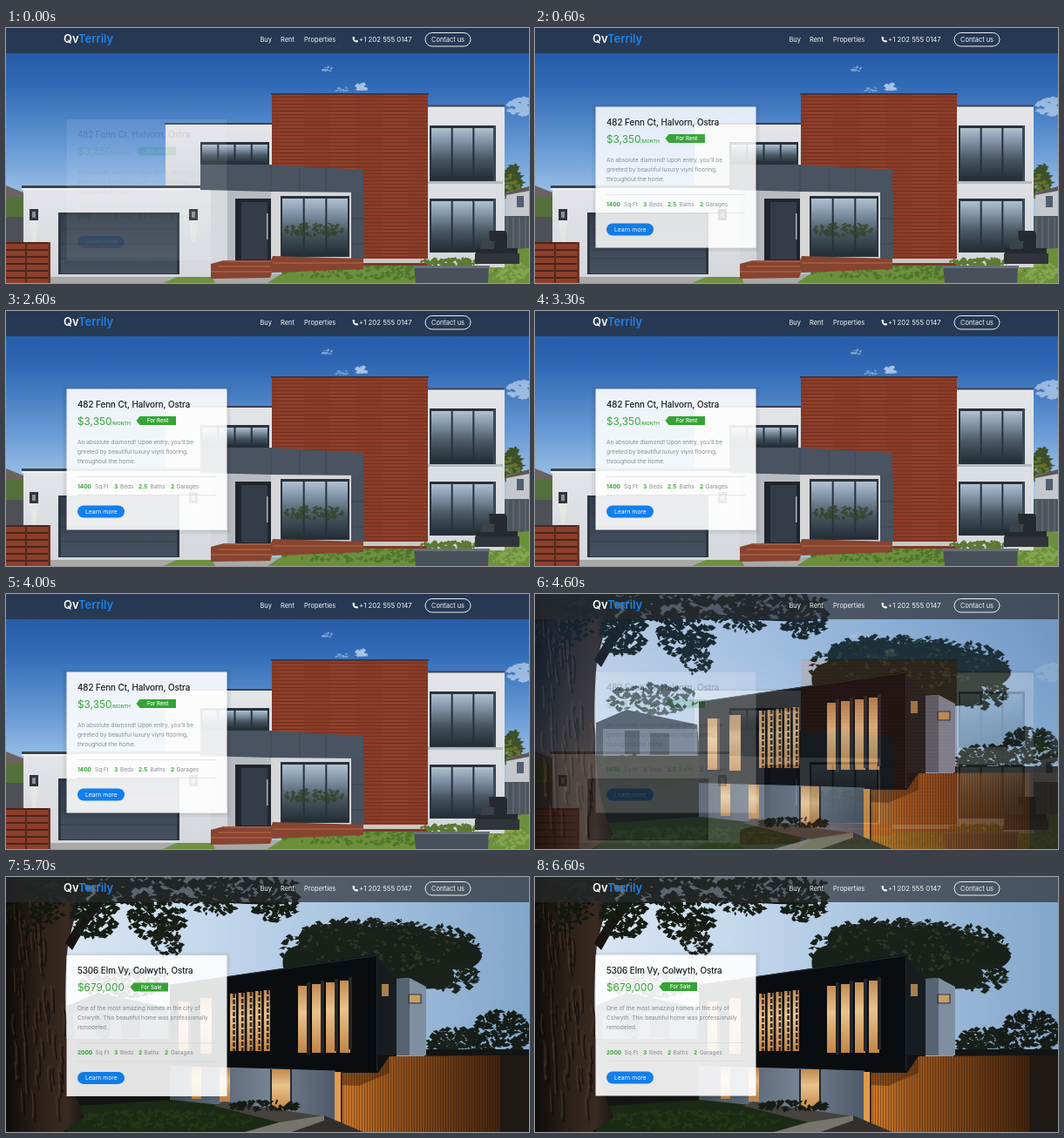
An HTML page for the animation above (6700 ms loop, 600 by 293 pixels).

```html
<!DOCTYPE html>
<html lang="en">
<head>
<meta charset="utf-8">
<title>Homes</title>
<style>
html, body { margin: 0; width: 100%; height: 100%; overflow: hidden; background: #26344e; }
svg { display: block; width: 100vw; height: 100vh; }
text { font-family: Inter, "Open Sans", sans-serif; white-space: pre; }
</style>
</head>
<body>
<svg id="stage" viewBox="0 0 600 293" preserveAspectRatio="none"></svg>
<script>
const LOOP = 6700, STEP = 100, FADE_START = 4300, FADE = 600, ENTRANCE = 1000, RISE = 17;

const rect = (x, y, w, h, fill, extra = '') =>
  `<rect x="${x}" y="${y}" width="${w}" height="${h}" fill="${fill}" ${extra}/>`;
const poly = (points, fill, extra = '') => `<polygon points="${points}" fill="${fill}" ${extra}/>`;
const path = (d, fill, extra = '') => `<path d="${d}" fill="${fill}" ${extra}/>`;
const line = (d, stroke, width = 1, extra = '') =>
  `<path d="${d}" fill="none" stroke="${stroke}" stroke-width="${width}" ${extra}/>`;
const text = (x, y, size, fill, str, extra = '') =>
  `<text x="${x}" y="${y}" font-size="${size}" fill="${fill}" ${extra}>${str}</text>`;
const gradient = (id, stops, dir = 'x2="0" y2="1"') =>
  `<linearGradient id="${id}" ${dir}>${stops.map(([o, c]) =>
    `<stop offset="${o}" stop-color="${c}"/>`).join('')}</linearGradient>`;
const slats = (id, w, h, base, content) =>
  `<pattern id="${id}" width="${w}" height="${h}" patternUnits="userSpaceOnUse">${rect(0, 0, w, h, base)}${content}</pattern>`;
const range = n => [...Array(n).keys()];

function random(seed) {
  return () => (seed = (seed * 16807) % 2147483647) / 2147483647;
}

// Scatter of small leaf shapes inside an ellipse.
function leaves(cx, cy, rx, ry, count, size, fill, extra = '') {
  const rnd = random(Math.round(cx * 31 + cy * 17 + count));
  const d = range(count).map(() => {
    const a = rnd() * Math.PI * 2, k = Math.sqrt(rnd());
    const x = cx + Math.cos(a) * rx * k, y = cy + Math.sin(a) * ry * k;
    const w = size * (.4 + rnd()), h = size * (.3 + rnd() * .7), s = (rnd() - .5) * size;
    return `M${(x - w).toFixed(1)} ${(y + s).toFixed(1)}L${x.toFixed(1)} ${(y - h).toFixed(1)}` +
      `L${(x + w).toFixed(1)} ${(y - s).toFixed(1)}L${x.toFixed(1)} ${(y + h).toFixed(1)}Z`;
  }).join('');
  return path(d, fill, extra);
}

const defs = '<defs>' +
  gradient('daySky', [[0, '#1f509d'], [.22, '#3069b5'], [.46, '#6497d3'], [.68, '#a3c5e8']]) +
  gradient('duskSky', [[0, '#e2ebf4'], [.4, '#c3d7ec'], [.7, '#a3c0de'], [1, '#83a6cb']], 'x2="1" y2="0"') +
  gradient('glass', [[0, '#b0c1cf'], [.25, '#8396a9'], [.6, '#485761'], [1, '#232d34']]) +
  gradient('dayWall', [[0, '#e3e5e9'], [1, '#d4d7dc']]) +
  gradient('garage', [[0, '#343e4c'], [1, '#465160']]) +
  gradient('glow', [[0, '#c18b53'], [.4, '#e9c38d'], [1, '#c28446']]) +
  gradient('lowWall', [[0, '#454f5c'], [.6, '#768394'], [1, '#4d5867']], 'x2="1" y2="0"') +
  gradient('bark', [[0, '#0e0b09'], [.4, '#2b2019'], [.75, '#3a2b22'], [1, '#191310']], 'x2="1" y2="0"') +
  gradient('woodShade', [[0, '#d17c2c'], [.25, '#a05a1f'], [.6, '#713e17'], [1, '#3f240f']], 'x2="1" y2="0"') +
  slats('redWood', 60, 4, '#8b3c28', rect(0, 3, 60, 1, '#74311f') + rect(12, 1, 30, 1, '#93432f')) +
  slats('fence', 60, 8, '#8c3f2b', rect(0, 6, 60, 2, '#4c241b')) +
  slats('slats', 3, 20, 'none', rect(0, 0, 1, 20, '#2a1406', 'opacity=".4"')) +
  '</defs>';

function pane(x, y, w, h, columns) {
  const step = (w - 2) / columns;
  return rect(x, y, w, h, '#28313c') + range(columns).map(i =>
    rect(x + 2 + i * step, y + 3, step - 2, h - 5, 'url(#glass)')).join('');
}

function lamp(x, y) {
  return rect(x, y, 10, 13, '#30353c') + rect(x + 3, y + 3, 4, 7, '#8d8f8f') +
    poly(`${x},${y + 13} ${x + 10},${y + 13} ${x + 7},${y + 37} ${x + 3},${y + 37}`, '#f6f2e6', 'opacity=".4"');
}

function dayHouse() {
  const clouds = leaves(408, 68, 6, 4, 14, 3, '#dbe8f7', 'opacity=".7"') +
    leaves(384, 71, 10, 3, 12, 2, '#bdd5f0', 'opacity=".5"') +
    leaves(369, 48, 5, 4, 10, 2, '#bdd5f0', 'opacity=".55"') +
    leaves(591, 90, 14, 9, 45, 5, '#d7e5f5', 'opacity=".6"') +
    leaves(566, 101, 6, 3, 10, 2, '#bdd5f0', 'opacity=".4"');
  const surroundings =
    poly('0,181 20,189 20,212 0,212', '#6b625f') + rect(0, 194, 20, 24, '#54703c') +
    rect(0, 217, 22, 30, '#4d5157') +
    leaves(582, 177, 12, 21, 100, 4, '#3d5029') + leaves(578, 184, 10, 16, 40, 3, '#65722f') +
    poly('574,189 600,184 600,216 574,216', '#c4c7cb') + poly('572,190 600,182 600,187 574,192', '#5d5759') +
    rect(586, 193, 8, 13, '#525f70') + rect(568, 216, 32, 40, '#4e555c') +
    line('M575 217V256M582 217V256M589 217V256M596 217V256', '#6c747b') +
    rect(0, 283, 600, 10, '#aaa9a7') + poly('395,266 600,253 600,293 300,293 318,281', '#6c8f3c') +
    leaves(440, 280, 125, 8, 160, 3, '#4f772c') + leaves(575, 280, 24, 12, 60, 3, '#85a64f') +
    poly('180,293 196,286 236,285 240,293', '#6f9141');
  const upper =
    rect(183, 110, 123, 76, 'url(#dayWall)') + rect(182, 109, 124, 2, '#3c424e') +
    pane(223, 131, 79, 26, 4) +
    rect(484, 90, 88, 185, 'url(#dayWall)') + rect(484, 88.5, 88, 2, '#3c424e') +
    rect(484, 176, 86, 3, '#b5bac2') +
    pane(486, 112, 76, 64, 3) + pane(486, 196, 76, 62, 3) +
    rect(559, 112, 3, 64, '#3a4654') + rect(559, 196, 3, 62, '#3a4654') +
    rect(305, 76, 179, 197, 'url(#redWood)') + rect(304, 75, 181, 1.7, '#3a3238');
  const lower =
    rect(20, 182, 240, 104, 'url(#dayWall)') + rect(18, 181, 206, 3, '#3b434f') + rect(18, 184, 206, 2, '#f0f1f3') +
    rect(60, 212, 139, 71, '#2c3541') + rect(63, 215, 133, 67, 'url(#garage)') +
    line('M63 231H196M63 248H196M63 265H196', '#303947', .8) +
    lamp(27, 208) + lamp(210, 208) +
    rect(235, 186, 28, 86, '#d3d6da') + rect(254, 187, 50, 82, '#b7bbc1') + rect(304, 187, 92, 79, '#d5d6d8') +
    rect(263, 196, 41, 72, '#20252d') + rect(270, 200, 30, 66, '#343c47') + rect(299, 213, 1.5, 30, '#aeb4bb') +
    pane(315, 193, 79, 70, 3) + leaves(354, 232, 35, 8, 80, 3, '#314023', 'opacity=".75"') +
    poly('223,157 304,157 410,163 410,189 304,188 223,186', '#495361') +
    line('M254 158V186M304 158V188M337 160V188M367 161V188', '#3b4451', .8) +
    rect(396, 188, 15, 85, '#48525f') + line('M396 219H411M396 248H411', '#38414d', .8) +
    poly('235,271 250,267 304,267 306,262 410,265 410,277 305,281 303,287 235,288', '#87442f') +
    line('M250 268H304M243 274H304M235 280H306M306 270H410', '#b96c50', 1.2) +
    rect(410, 265, 76, 5, '#c9c8c5');
  const front =
    rect(0, 246, 51, 47, 'url(#fence)') + rect(22, 246, 2, 47, '#54291e') + rect(48, 246, 3, 47, '#6f3323') +
    leaves(510, 269, 36, 4, 100, 3, '#5d7832') +
    poly('468,273 554,273 553,293 470,293', '#48505a') + rect(467, 273, 88, 3, '#68707a') +
    path('M554 233h17q4 0 4 5v15h12v6h-48v-6h18l4-8h-6z', '#262a30') + rect(538, 259, 51, 12, '#31353b') +
    path('M545 248q7-8 15-2v8h-16z', '#3c4249');
  return rect(0, 0, 600, 293, 'url(#daySky)') + clouds + surroundings + upper + lower + front;
}

function duskHouse() {
  const glow = (x, top, w, bottom) => rect(x, top, w, bottom - top, 'url(#glow)');
  const background =
    path('M318 104Q314 82 338 78Q328 62 356 58Q384 48 420 58Q470 50 494 66Q545 72 546 92Q540 108 512 106Q520 126 496 128L440 130L330 112Z', '#18211a') +
    leaves(430, 82, 116, 34, 420, 4, '#18211a') + leaves(430, 78, 90, 30, 120, 3, '#2b3626') +
    leaves(512, 114, 30, 17, 110, 4, '#1a231b') + leaves(390, 62, 45, 14, 90, 4, '#1a231b') +
    leaves(515, 190, 30, 17, 180, 4, '#182019') + leaves(568, 180, 36, 26, 260, 4, '#161d18') +
    rect(480, 198, 120, 95, '#121513') +
    rect(567, 205, 33, 88, '#1d1a17') + rect(567, 205, 33, 88, 'url(#slats)') +
    leaves(135, 121, 52, 18, 130, 4, '#39443e') +
    poly('70,148 105,133 186,150 190,192 70,192', '#2c333c') + rect(78, 155, 108, 32, '#5a6573') +
    rect(103, 157, 17, 27, '#2b333d') + rect(132, 160, 22, 25, '#2e3741') +
    rect(0, 186, 190, 107, '#131612') + leaves(115, 204, 75, 18, 140, 5, '#10150f');
  const building =
    poly('448,117 463,116 482,126 482,205 448,205', '#7f8fa2') + poly('448,117 463,116 463,205 448,205', '#566373') +
    rect(463, 135, 13, 9, '#c99e61') + line('M462 135h14v10h-14z', '#303740', 1.2) +
    poly('424,90 448,119 448,205 424,225', '#171c21') + rect(431, 123, 8, 14, '#a9804c') +
    rect(188, 215, 192, 78, 'url(#lowWall)') + rect(378, 205, 70, 34, '#0f1113') +
    glow(213, 218, 11, 255) + glow(245, 219, 12, 258) + glow(305, 221, 22, 268) +
    rect(303, 221, 2, 47, '#252b31') + rect(326, 221, 2, 47, '#252b31') +
    poly('188,124 424,89 427,90 427,224 330,221 188,217', '#0a0d10') +
    line('M188 124L426 90', '#272e34', 1) + rect(425, 91, 1.5, 132, '#20272d') +
    glow(198, 143, 13, 202) + glow(223, 139, 13, 203) + rect(209, 143, 3, 59, '#4e3826') +
    range(5).map(i => glow(257 + i * 9.7, 134 - i, 7, 200) +
      line(`M${261.5 + i * 9.7} ${134 - i}V200`, '#2d241d', 2.5, 'stroke-dasharray="5 2"')).join('') +
    range(4).map(i => glow(335 + i * 16, 125 - i * 2, 12, 202) +
      rect(345 + i * 16, 121 - i * 2, 4, 83, '#252628')).join('');
  const ground =
    rect(377, 224, 8, 69, '#df9c4a') + rect(384, 224, 3, 69, '#3b210f') +
    poly('386,225 427,225 440,206 567,205 567,293 386,293', 'url(#woodShade)') +
    poly('386,225 427,225 440,206 567,205 567,293 386,293', 'url(#slats)') +
    poly('386,225 427,225 440,206 440,225 405,240 386,239', '#34190a', 'opacity=".45"') +
    poly('70,264 190,256 305,268 340,277 300,293 70,293', '#1b2a14') +
    leaves(180, 279, 105, 11, 190, 3, '#243518') +
    poly('250,258 365,275 362,293 275,293 314,282 239,263', '#46433f') +
    poly('274,293 313,282 365,274 365,280 328,293', '#77736d') + poly('365,274 410,293 328,293 365,280', '#322f2d') +
    leaves(295, 263, 43, 5, 60, 4, '#171c14');
  const rnd = random(73);
  const bark = range(55).map(() => {
    const x = 8 + rnd() * 56, y = 10 + rnd() * 245;
    return `M${x.toFixed(1)} ${y.toFixed(1)}q${(rnd() * 8 - 4).toFixed(1)} 10 1 ${(14 + rnd() * 20).toFixed(1)}`;
  }).join('');
  const tree =
    path('M0 0H93Q80 38 71 78Q66 130 70 190Q73 242 90 276L65 293H0Z', 'url(#bark)') +
    line(bark, '#5c4535', 1.2, 'opacity=".5"') + line(bark, '#0d0907', 1.5, 'transform="translate(3 4)" opacity=".65"') +
    path('M68 76Q88 38 125 0H145Q105 30 76 84Z', '#17120f') +
    line('M105 35Q160 18 215 25T324 30M142 24Q170 38 185 75M83 58Q101 58 123 40', '#12130f', 2) +
    leaves(180, 10, 155, 20, 460, 5, '#131a12') + leaves(173, 49, 33, 25, 190, 4, '#151c14') +
    leaves(186, 73, 17, 20, 80, 3, '#192118') + leaves(102, 45, 27, 26, 160, 4, '#151c14') +
    leaves(309, 29, 27, 22, 160, 4, '#151c14') + leaves(238, 33, 26, 11, 80, 3, '#192118') +
    leaves(25, 35, 42, 27, 100, 4, '#12170f');
  return rect(0, 0, 600, 293, 'url(#duskSky)') + background + building + ground + tree;
}

function navigation() {
  const link = (x, label) => text(x, 16, 7.45, '#f4f6f8', label);
  return rect(0, 0, 600, 29, '#282b2f', 'opacity=".68"') +
    text(66, 16.5, 12.9, '#fff', 'Qv<tspan fill="#1d83e8">Terrily</tspan>', 'font-weight="600"') +
    link(291.5, 'Buy') + link(315, 'Rent') + link(342, 'Properties') +
    path('M397.5 10.5l1.7-.7 1.2 2-.8 1q.6 1.1 1.7 1.7l1-.8 1.8 1.2-.7 1.7q-6-.2-5.9-6.1z', '#fff') +
    text(405, 16, 7.8, '#f4f6f8', '+1 202 555 0147') +
    rect(481, 5.5, 52, 15.5, 'none', 'rx="7.75" stroke="#fff" stroke-width=".9"') + link(488, 'Contact us');
}

function card(home) {
  const green = '#35a435', gray = '#858b92';
  const shadow = range(5).map(i => rect(69.5 - i - .5, 90 - i, 185 + 2 * i, 162.5 + 2 * i, 'none',
    'stroke="#000" opacity="' + (.1 - i * .02) + '"')).join('');
  const t = home.tagX;
  const features = home.features.map(([x, count, labelX, label]) =>
    text(x, 203.5, 6.5, green, count, 'font-weight="700"') + text(labelX, 203.5, 6.45, gray, label)).join('');
  return shadow + rect(69.5, 89.5, 184, 162, '#fff', 'opacity=".9"') +
    text(82, 110.5, 9.8, '#101214', home.address, 'stroke="#101214" stroke-width=".15"') +
    text(82, 130.5, 11.8, green, home.price) + text(121, 130.5, 5.2, green, home.unit, 'font-weight="500"') +
    poly(`${t},126 ${t + 4},121 ${t + home.tagW},121 ${t + home.tagW},131 ${t + 4},131`, green) +
    text(t + 12.5, 128.2, 6.1, '#fff', home.tag, 'font-weight="500"') +
    home.about.map((s, i) => text(82, 153 + i * 11, 6.56, gray, s)).join('') +
    line('M82 190.5H241M82 211.5H241', '#d9dce0', .7) + features +
    rect(82, 223.5, 54, 14, '#117fec', 'rx="7"') + text(91, 233, 6.8, '#fff', 'Learn more');
}

const homes = [
  {
    scene: dayHouse, start: -100, address: '482 Fenn Ct, Halvorn, Ostra',
    price: '$3,350', unit: '/MONTH', tag: 'For Rent', tagX: 149.5, tagW: 45.5,
    about: ['An absolute diamond! Upon entry, you’ll be',
      'greeted by beautiful luxury viynl flooring,', 'throughout the home.'],
    features: [[82, '1400', 102, 'Sq Ft'], [124, '3', 131, 'Beds'], [152, '2.5', 165.5, 'Baths'], [189, '2', 195.5, 'Garages']]
  },
  {
    scene: duskHouse, start: FADE_START + FADE, address: '5306 Elm Vy, Colwyth, Ostra',
    price: '$679,000', unit: '', tag: 'For Sale', tagX: 142.5, tagW: 43.5,
    about: ['One of the most amazing homes in the city of',
      'Colwyth. This beautiful home was professionally', 'remodeled.'],
    features: [[82, '2000', 102.5, 'Sq Ft'], [124, '3', 131, 'Beds'], [152, '2', 158.5, 'Baths'], [182, '2', 189, 'Garages']]
  }
];

// Same curve as the CSS "ease" keyword.
function ease(x) {
  if (x <= 0 || x >= 1) return Math.min(1, Math.max(0, x));
  const curve = (a, b, s) => 3 * a * s * (1 - s) ** 2 + 3 * b * s * s * (1 - s) + s ** 3;
  let low = 0, high = 1;
  for (let i = 0; i < 24; i++) {
    const mid = (low + high) / 2;
    if (curve(.25, .25, mid) < x) low = mid; else high = mid;
  }
  return curve(.1, 1, low);
}

const stage = document.getElementById('stage');
stage.innerHTML = defs + homes.map(h => `<g class="scene">${h.scene()}</g>`).join('') +
  navigation() + homes.map(h => `<g class="card">${card(h)}</g>`).join('');
const scenes = stage.querySelectorAll('.scene'), cards = stage.querySelectorAll('.card');

function render(ms) {
  const time = Math.floor((ms % LOOP) / STEP) * STEP;
  const fade = ease((time - FADE_START) / FADE);
  scenes[1].setAttribute('opacity', fade);
  homes.forEach((home, i) => {
    const progress = ease((time - home.start) / ENTRANCE);
    cards[i].setAttribute('opacity', progress * (i ? fade : 1 - fade));
    cards[i].setAttribute('transform', `translate(0 ${RISE * (1 - progress)})`);
  });
}

const began = performance.now();
function tick() {
  render(performance.now() - began);
  requestAnimationFrame(tick);
}
tick();
</script>
</body>
</html>
```
